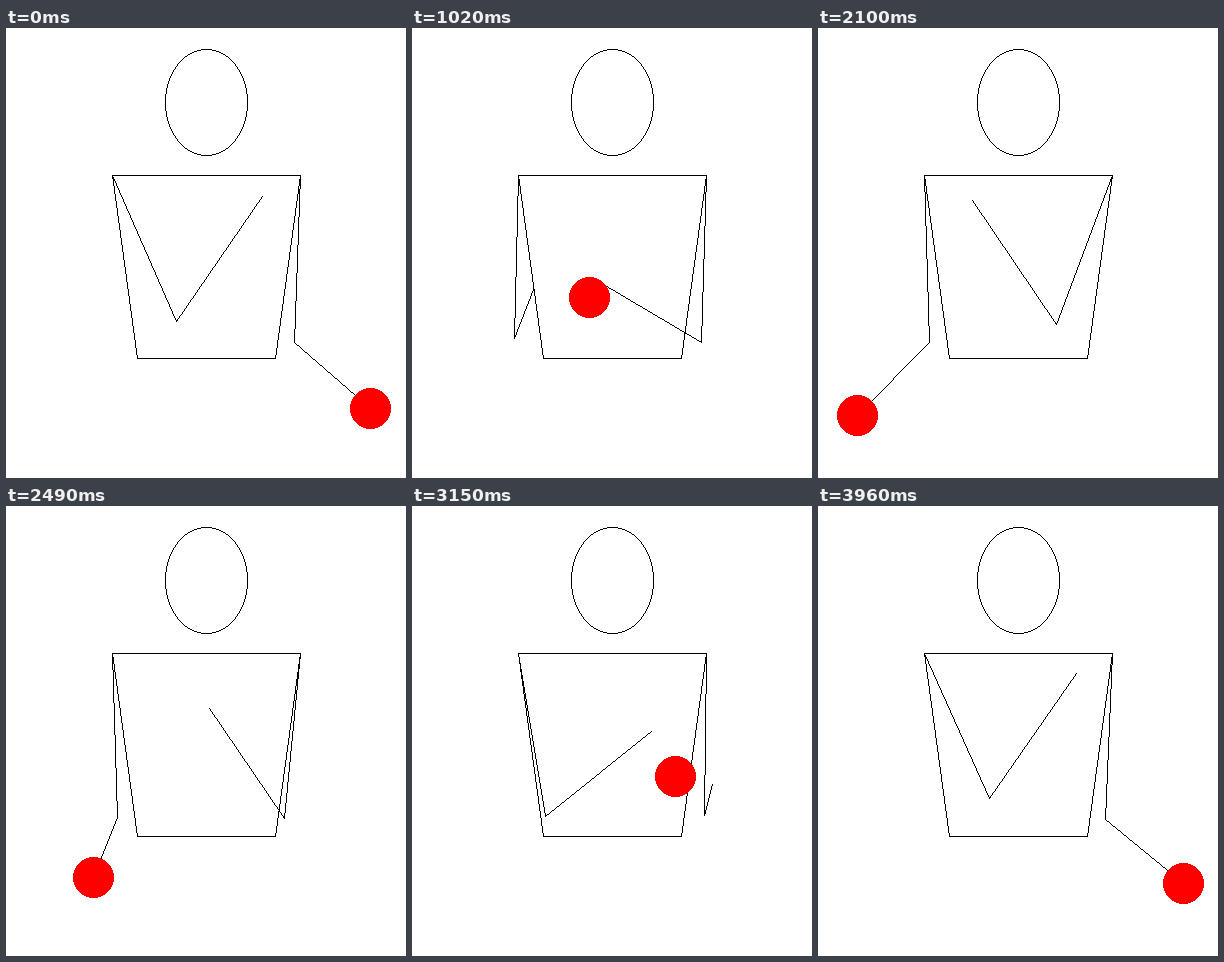
An HTML page with a canvas for the animation above (3990 ms loop, 400 by 450 pixels).

```html
<!DOCTYPE html>
<html lang="en">
<head>
<meta charset="utf-8">
<title>Ball toss</title>
<style>
html, body { margin: 0; width: 100%; height: 100%; overflow: hidden; background: #fff; }
canvas { display: block; width: 400px; height: 450px; }
</style>
</head>
<body>
<canvas id="stage" width="400" height="450"></canvas>
<script>
const ctx = document.getElementById('stage').getContext('2d');
const { cos, sin, sqrt, round, hypot } = Math;
const PERIOD = 3990, HALF = PERIOD / 2, STEP = 30;
const RELEASE = 900, CATCH = 1385, LIFT = 26.5;
const SHOULDER = [106, 147], LIMB = 167, REACH = 122;

const mirror = ([x, y]) => [400 - x, y];

// The left hand swings once per loop along a smooth closed curve.
function leftHand(time) {
  const a = 2 * Math.PI * time / PERIOD;
  return [
    154.4 + 111.8 * cos(a) - 39.5 * sin(a) - 10.5 * cos(2 * a) - 9.9 * sin(2 * a)
      - 1.8 * cos(3 * a) + 2.9 * sin(3 * a) + 2 * cos(4 * a),
    267.5 - 108.1 * cos(a) - 4.5 * sin(a) + 7.9 * cos(2 * a) + 17.1 * sin(2 * a)
      + 2.1 * cos(3 * a) - 4.2 * sin(3 * a) - 1.4 * cos(4 * a)
  ];
}

const rightHand = time => mirror(leftHand(time + HALF));

// Two equal limbs in depth: the hand is REACH in front, the elbow hangs down.
function leftElbow([hx, hy]) {
  const dx = hx - SHOULDER[0], dy = hy - SHOULDER[1];
  const span = hypot(dx, dy, REACH);
  const drop = sqrt(LIMB ** 2 - span ** 2 / 4);
  const slant = dy / span, down = sqrt(1 - slant ** 2);
  return [
    SHOULDER[0] + dx / 2 - drop * slant * dx / span / down,
    SHOULDER[1] + dy / 2 + drop * down
  ];
}

function ballAt(t) {
  if (t >= HALF) return mirror(ballAt(t - HALF));
  if (t < RELEASE) return rightHand(t);
  if (t >= CATCH) return leftHand(t);
  const from = rightHand(RELEASE), to = leftHand(CATCH);
  const p = (t - RELEASE) / (CATCH - RELEASE);
  return [
    from[0] + (to[0] - from[0]) * p,
    from[1] + (to[1] - from[1]) * p - 4 * LIFT * p * (1 - p)
  ];
}

const dot = (x, y) => ctx.fillRect(round(x), round(y), 1, 1);

// Unsmoothed lines, one pixel per step.
function line(from, to) {
  const [x0, y0] = from.map(round), [x1, y1] = to.map(round);
  const n = Math.max(Math.abs(x1 - x0), Math.abs(y1 - y0), 1);
  for (let i = 0; i <= n; i++) dot(x0 + (x1 - x0) * i / n, y0 + (y1 - y0) * i / n);
}

const polyline = points => points.slice(1).forEach((p, i) => line(points[i], p));

// Columns where the outline is flat, rows where it is steep.
function ellipse(cx, cy, rx, ry) {
  const diagonal = hypot(rx, ry);
  const plot = (x, y) => {
    for (const sx of [-1, 1]) for (const sy of [-1, 1]) dot(cx + sx * x, cy + sy * y);
  };
  for (let x = 0; x <= rx * rx / diagonal; x++) plot(x, round(ry * sqrt(1 - (x / rx) ** 2)));
  for (let y = 0; y <= ry * ry / diagonal; y++) plot(round(rx * sqrt(1 - (y / ry) ** 2)), y);
}

function disc(center, r) {
  const [x, y] = center.map(round);
  for (let dy = -r; dy <= r; dy++) {
    const w = round(sqrt((r + 0.5) ** 2 - dy ** 2) - 0.5);
    ctx.fillRect(x - w, y + dy, 2 * w + 1, 1);
  }
}

function draw(t) {
  ctx.fillStyle = '#fff';
  ctx.fillRect(0, 0, 400, 450);
  ctx.fillStyle = '#000';
  ellipse(200, 74, 41, 53);
  polyline([SHOULDER, [294, 147], [269, 330], [131, 330], SHOULDER]);
  const left = leftHand(t), twin = leftHand(t + HALF);
  polyline([SHOULDER, leftElbow(left), left]);
  polyline([SHOULDER, leftElbow(twin), twin].map(mirror));
  ctx.fillStyle = '#f00';
  disc(ballAt(t), 20);
}

const start = performance.now();
function tick() {
  const t = (performance.now() - start) % PERIOD;
  draw(Math.floor(t / STEP) * STEP);
  requestAnimationFrame(tick);
}
tick();
</script>
</body>
</html>
```
